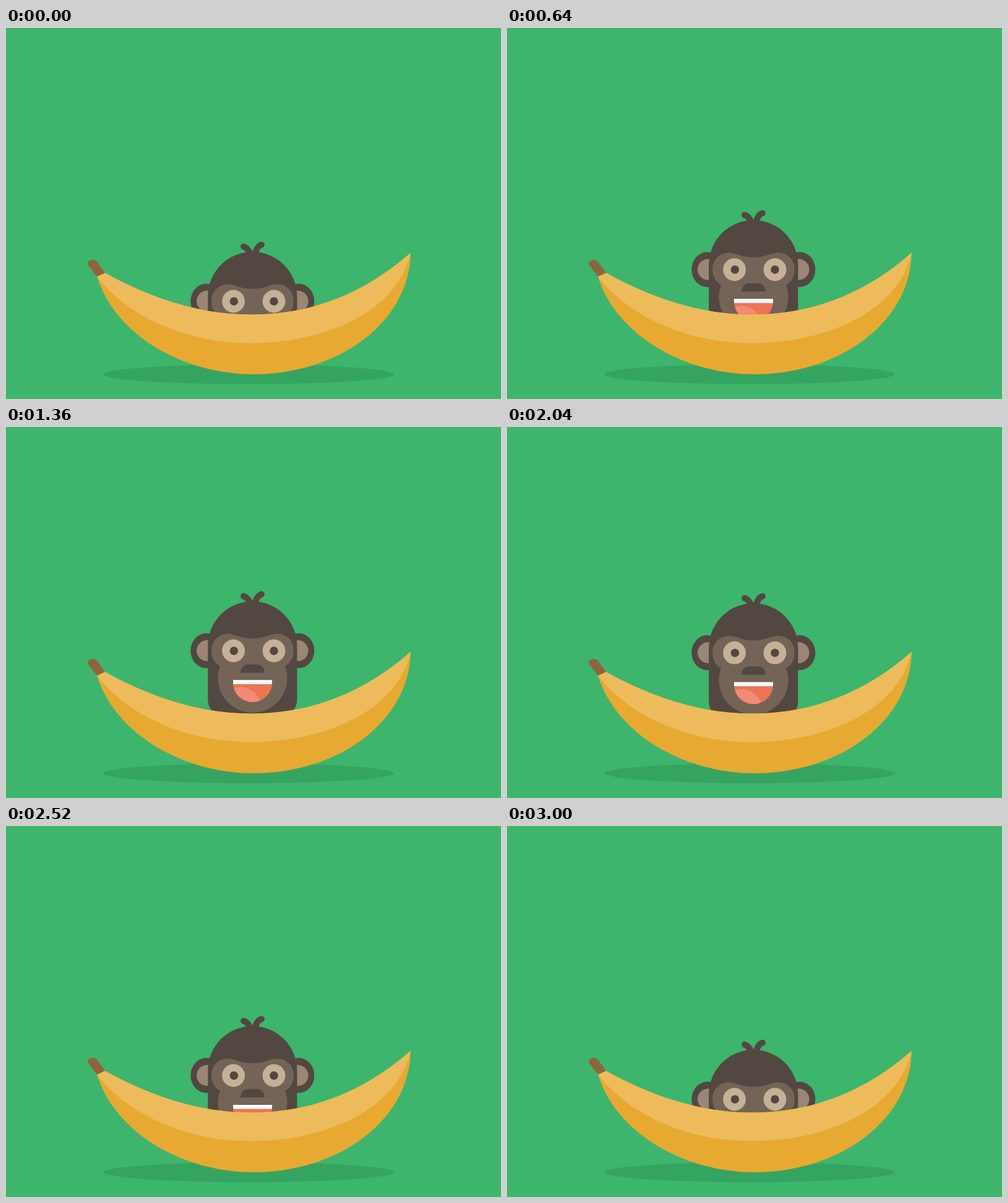
These frames come from a looping animation (800 by 600 pixels, 4 s). An HTML page:

```html
<!DOCTYPE html>
<html lang="en">
<head>
<meta charset="utf-8">
<title>Peeking monkey</title>
<style>
  html, body { margin: 0; width: 100%; height: 100%; overflow: hidden; background: #3db56c; }
  svg { display: block; width: 100%; height: 100%; }
  .dark { fill: #534741; }
  .face { fill: #746458; }
  .inner { fill: #9b8675; }
  .eye { fill: #c6b198; }
  .hair { fill: none; stroke: #534741; stroke-width: 10; stroke-linecap: round; }
</style>
</head>
<body>
<svg viewBox="0 0 800 600">
  <defs>
    <g id="ear">
      <ellipse class="dark" cx="323.6" cy="361.8" rx="25.3" ry="28.3"/>
      <ellipse class="inner" cx="325.5" cy="361.8" rx="17.5" ry="17"/>
    </g>
    <clipPath id="mouth">
      <path d="M367 409.3H430V413.5A31.5 31.5 0 0 1 367 413.5Z"/>
    </clipPath>
  </defs>

  <ellipse cx="392.3" cy="560" rx="235" ry="16" fill="#36a461"/>

  <g id="monkey">
    <use href="#ear"/>
    <use href="#ear" transform="matrix(-1 0 0 1 796.6 0)"/>
    <path class="hair" d="M384 273.6Q391 275.5 395 286M413 270.6Q406 272 402 286"/>
    <path class="dark" d="M326.2 354A72.1 72.1 0 0 1 470.4 354V441A28 28 0 0 1 442.4 469H354.2A28 28 0 0 1 326.2 441Z"/>
    <circle class="face" cx="398.5" cy="406" r="56"/>
    <path class="face" d="M332 361.5C332 346 344 334.6 358 334.6C371 334.6 378 342 398.3 342C418.6 342 426 334.6 439 334.6C453 334.6 465 346 465 361.5C465 375 458 386 446 388H351C339 386 332 375 332 361.5Z"/>
    <circle class="eye" cx="367.6" cy="362" r="18.4"/>
    <circle class="eye" cx="433" cy="362" r="18.4"/>
    <circle class="dark" cx="368.4" cy="362" r="6.8"/>
    <circle class="dark" cx="433" cy="362" r="6.8"/>
    <path class="dark" d="M379 397.5C379 390 384 384 391 384H406C413 384 418 390 418 397.5Z"/>
    <g clip-path="url(#mouth)">
      <rect x="366" y="408" width="66" height="40" fill="#ed7455"/>
      <circle cx="379" cy="453.5" r="33" fill="#f18a76"/>
      <rect x="366" y="408" width="66" height="8" fill="#fff"/>
    </g>
  </g>

  <path fill="#e8a932" d="M147 402L160 396C233 436.5 312 463.5 395 463.5C497 463.5 582 427 654 363.5C652 478 535 560 400 560C290 560 178 500 147 402Z"/>
  <path fill="#edbb5b" d="M147 402L160 396C233 436.5 312 463.5 395 463.5C497 463.5 582 427 654 363.5C632 460 515 509.5 395 509.5C295 509.5 200 470 147 402Z"/>
  <path fill="#8f643c" d="M147 402L132.6 383.5C129.5 377 140 371.5 146.5 377.5L160 396Z"/>
</svg>
<script>
  const monkey = document.getElementById('monkey');
  const LOOP = 4000, STEP = 40, DEPTH = 80;
  const clamp = v => Math.min(1, Math.max(0, v));

  // Rise for one second, wait, sink for one second, wait.
  function draw() {
    const now = performance.now() % LOOP;
    const t = (now - now % STEP) / 1000;
    const hidden = 1 - clamp(t) + clamp(t - 2);
    monkey.setAttribute('transform', `translate(0 ${DEPTH * hidden})`);
    requestAnimationFrame(draw);
  }
  draw();
</script>
</body>
</html>
```
